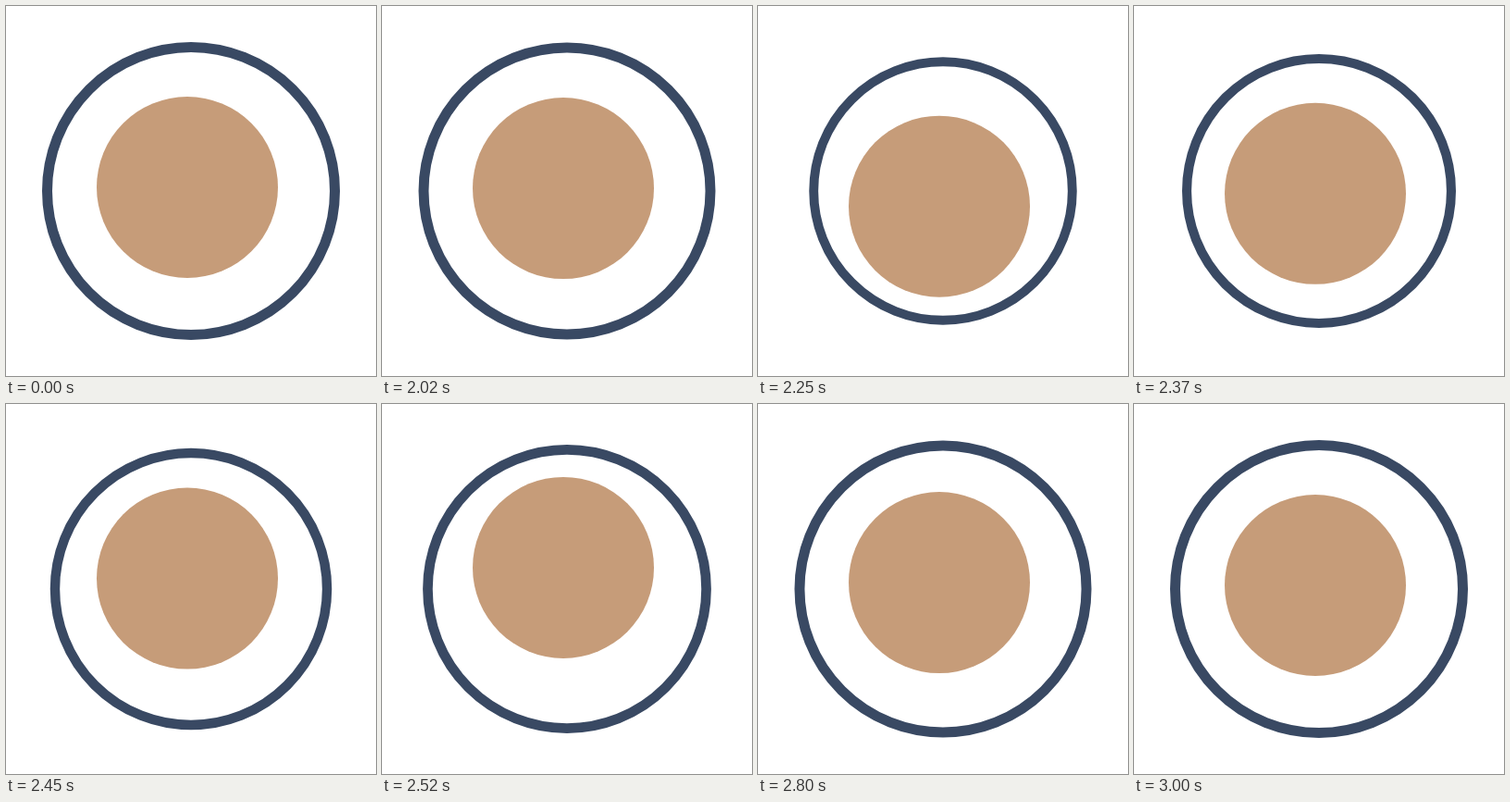
An HTML page for the animation above (3.02 s loop, 400 by 400 pixels).

```html
<!DOCTYPE html>
<html lang="en">
<head>
<meta charset="utf-8">
<title>Pulsing ring</title>
<style>
  html, body { margin: 0; width: 100%; height: 100%; overflow: hidden; background: #fff; }
  svg { display: block; width: 100%; height: 100%; }
</style>
</head>
<body>
<svg viewBox="0 0 400 400">
  <circle id="ring" r="155.5" fill="none" stroke="#394963" stroke-width="11" transform="translate(200 200)"/>
  <circle id="disc" cx="196" cy="196" r="98" fill="#c69c79"/>
</svg>
<script>
const LOOP = 3020, START = 2020;
const ring = document.getElementById('ring');
const disc = document.getElementById('disc');

// [time in ms, value]
const ringScale = [[2000, 1], [2120, .944], [2230, .9], [2370, .919], [2520, .968], [2660, .99], [2800, .997], [3000, 1]];
const discShift = [[2000, 0], [2120, 18], [2200, 24], [2370, 7], [2520, -19], [2600, -21], [2800, -3], [3000, 0]];

// Smooth curve through the keys, at rest at both ends.
function sample(keys, t) {
  const last = keys.length - 1;
  if (t >= keys[last][0]) return keys[last][1];
  const i = keys.findIndex(k => k[0] > t) - 1;
  const slope = n => n === 0 || n === last ? 0
    : (keys[n + 1][1] - keys[n - 1][1]) / (keys[n + 1][0] - keys[n - 1][0]);
  const [t0, a] = keys[i], [t1, b] = keys[i + 1];
  const d = t1 - t0, u = (t - t0) / d, v = 1 - u;
  return a * v * v * (1 + 2 * u) + b * u * u * (3 - 2 * u)
    + d * u * v * (slope(i) * v - slope(i + 1) * u);
}

function draw() {
  const t = performance.now() % LOOP;
  const moving = t >= START;
  const scale = moving ? sample(ringScale, t) : 1;
  const shift = moving ? sample(discShift, t) : 0;
  ring.setAttribute('transform', `translate(200 200) scale(${scale})`);
  disc.setAttribute('cy', 196 + shift);
  requestAnimationFrame(draw);
}
draw();
</script>
</body>
</html>
```
